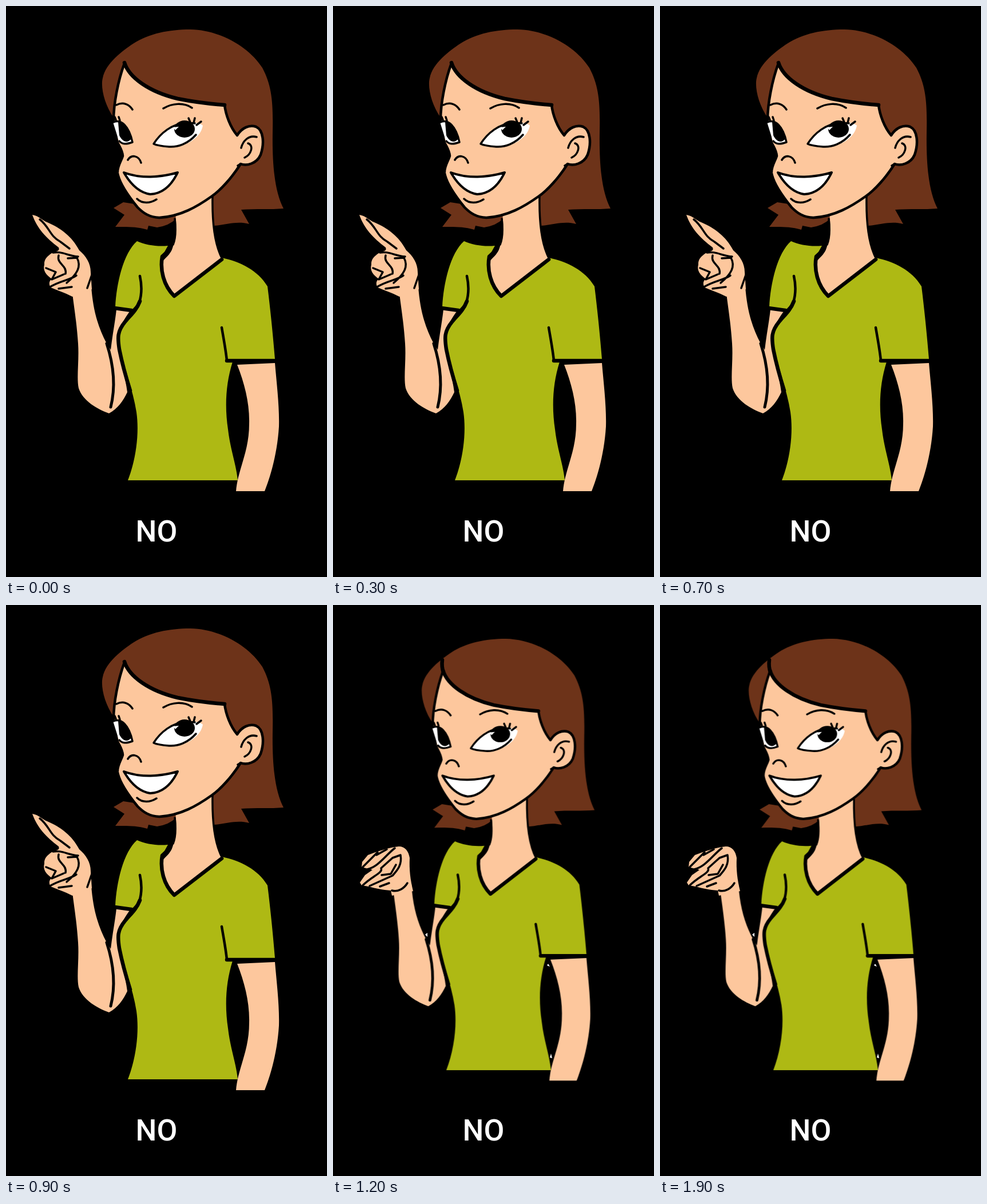
An HTML page for the animation above (2000 ms loop, 561x998 px).

```html
<!DOCTYPE html>
<html lang="en">
<head>
<meta charset="utf-8">
<title>No</title>
<style>
  html, body { margin: 0; width: 100%; height: 100%; overflow: hidden; background: #000; }
  svg { display: block; width: 100vw; height: 100vh; }
  path { stroke-linejoin: round; stroke-linecap: round; }
  .hair { fill: #6d3319; }
  .skin { fill: #fdc79d; }
  .shirt { fill: #aeb914; }
  .white { fill: #fff; }
  .ink { stroke: #000; stroke-width: 4.5; }
  .line { fill: none; stroke: #000; stroke-width: 3.5; }
  .bold { stroke-width: 6.5; }
  text { font: 500 52px Roboto, sans-serif; fill: #fff; text-anchor: middle; }

  /* Two held poses, one second each. */
  #body { animation: lean 2s step-end infinite; }
  #point { animation: first 2s step-end infinite; }
  #pinch { animation: second 2s step-end infinite; }
  @keyframes lean {
    0% { transform: none; }
    50%, 100% { transform: matrix(.953, 0, 0, .957, -5, 19.8); }
  }
  @keyframes first { 0% { visibility: visible; } 50%, 100% { visibility: hidden; } }
  @keyframes second { 0% { visibility: hidden; } 50%, 100% { visibility: visible; } }
</style>
</head>
<body>
<svg viewBox="0 0 561 998">
  <rect width="561" height="998"/>
  <g id="body">
    <path class="hair" d="M188 195C172 172 165 142 169 126C174 100 204 78 222 66C250 48 285 41 322 41C375 42 425 72 448 108C465 140 467 170 466 220C465 280 470 325 485 354C462 356 435 354 411 356L425 381C402 375 384 383 363 384L297 372Q285 384 264 387L249 384L247 391C226 385 210 386 191 386L207 365L188 353L205 343L250 350V200Z"/>

    <!-- arms -->
    <path class="skin" d="M193 530L217 533C205 548 194 570 197 592C200 622 209 650 212 675C205 690 195 704 180 712C160 705 134 690 127 668C123 650 128 620 126 590C124 560 121 540 116 503L149 490C152 530 160 560 176 590L183 601C186 575 191 550 193 530Z"/>
    <path class="line" style="stroke-width:5" d="M176 590C189 630 192 665 183 701"/>
    <path class="skin" d="M404 627L470 624C473 660 478 700 477 735C474 785 461 825 452 848H402C405 810 425 780 425 730C426 695 417 660 404 627Z"/>

    <!-- neck and shirt -->
    <path class="skin" d="M296 362L360 325C360 380 365 420 377 443L294 505C280 490 272 470 273 448C277 440 290 435 293 415C298 395 298 380 296 362Z"/>
    <path class="line" d="M361 332C360 380 365 418 378 442M295 372C297 390 297 405 292 417"/>
    <path class="shirt" d="M229 411C245 418 265 421 283 419L273 437C267 460 276 490 294 507L377 440C410 447 440 462 457 490C462 530 467 580 470 617L396 622C384 660 382 700 388 740C392 775 402 800 405 829H213C228 790 233 745 228 710C222 670 205 630 198 590C195 570 205 555 218 540L232 518L221 530L191 526C193 485 205 432 229 411Z"/>
    <path class="line bold" d="M286 426L273 438C269 461 275 488 294 507L377 443M190 528L219 532M234 516C228 532 217 541 208 552C194 569 195 580 198 600C203 625 210 650 217 672M386 620L474 620"/>
    <path class="line" style="stroke-width:4.5" d="M234 472C238 490 237 505 233 518M377 562C380 580 384 600 386 620"/>

    <!-- face -->
    <path class="skin ink" d="M207 100C215 125 250 150 300 162C330 168 355 171 382 173C384 190 392 212 404 226C412 213 425 207 437 211C450 217 452 240 445 260C438 276 420 280 410 276C395 300 375 322 359 333C335 350 305 368 268 370C250 369 240 362 230 352C212 330 198 310 195 292C194 280 202 270 204 262C203 250 196 243 194 236L188 200C188 170 196 130 207 100Z"/>
    <path class="line bold" d="M207 99C215 125 250 150 300 162C330 168 355 171 382 173"/>
    <path class="line" d="M438 229C424 225 414 236 411 248M423 240C434 244 428 260 417 265M410 276L405 279M275 179C290 170 310 168 325 178M193 173C205 167 215 172 221 181M213 269C219 259 232 261 236 274M229 337C238 346 252 345 263 338"/>
    <path class="white" d="M187 203C200 196 216 208 221 238C210 243 202 242 197 235Z"/>
    <path d="M196 203C207 202 216 216 219 232C212 241 203 237 198 226Z"/>
    <path class="line" d="M188 203C201 197 215 210 221 238C210 242 203 242 198 236M192 199L190 194M199 200L197 194"/>
    <path class="white" d="M258 241C270 222 290 206 315 204C330 203 340 205 344 209C340 232 312 247 285 246C272 245 262 243 258 241Z"/>
    <ellipse cx="312" cy="215" rx="18" ry="15"/>
    <path class="white" d="M292 212L302 211L296 217Z"/>
    <path class="line" d="M332 225C318 241 300 247 285 246C272 245 262 243 258 241C270 222 290 206 315 204L330 205M322 203L319 196M328 204L330 196M333 208L341 202"/>
    <path class="white ink" style="stroke-width:4" d="M206 291C235 302 270 300 300 291C290 312 275 328 252 329C232 326 218 312 206 291Z"/>
  </g>

  <g id="point">
    <path class="skin" d="M46 365C58 367 62 374 72 378C95 388 115 402 128 427C140 437 148 450 148 465L150 495L116 508C100 500 90 497 78 492C74 485 76 480 80 477C70 470 64 462 67 452C66 442 74 436 80 432C85 428 95 430 92 422C70 405 55 390 46 365Z"/>
    <path class="line" d="M59 373C76 386 76 402 95 412L111 424M82 431C98 428 108 437 126 438M92 436C88 451 107 453 104 468M108 441L124 440C132 455 125 468 106 484M70 458L87 465L80 478L101 469M77 491C95 480 112 479 123 471M92 494L115 491M150 470L142 493"/>
  </g>

  <g id="pinch">
    <path class="skin" d="M61 437C75 432 95 424 115 422C126 422 132 430 134 442C133 462 135 480 140 500L103 508L101 499C88 498 72 495 62 492L50 490L47 485L56 472L69 463L50 458L51 449Z"/>
    <path class="line" d="M52 458L78 432M60 462C80 457 92 437 108 425M76 437L94 427M52 490C68 474 88 468 84 460L104 442L118 437C121 455 112 464 104 473L64 491M85 472L101 470L110 454M82 492L98 486M103 499C113 502 124 496 130 486"/>
    <path class="line bold" d="M191 96C190 104 191 112 193 118"/>
    <path class="white" d="M161 576L165 573V580ZM376 627L379 632L374 630ZM381 784L383 792L379 791Z"/>
  </g>

  <text x="263" y="936">NO</text>
</svg>
</body>
</html>
```
